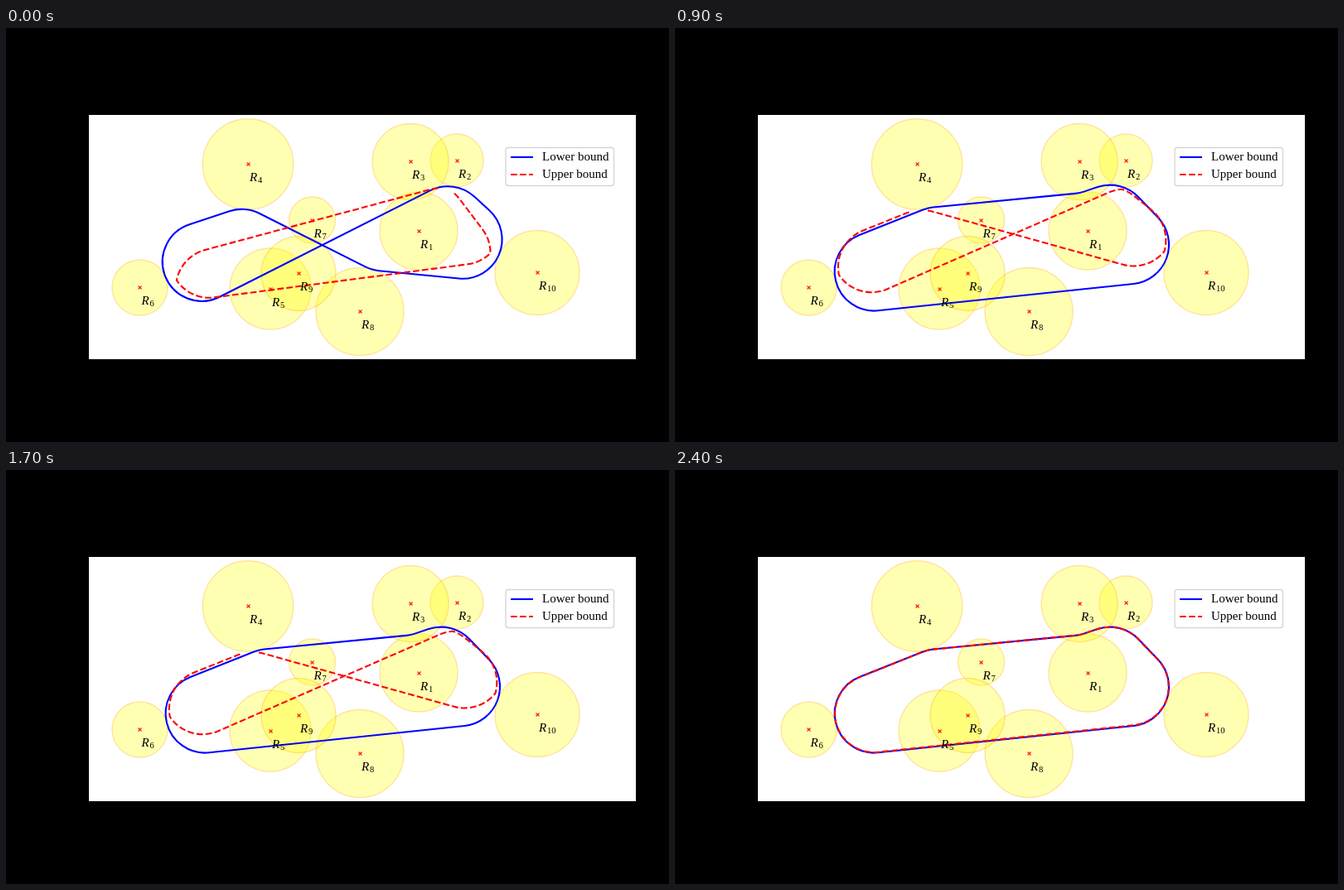
An HTML page with a canvas for the animation above (4500 ms loop, 800 by 500 pixels).

```html
<!DOCTYPE html>
<html lang="en">
<head>
<meta charset="utf-8">
<title>Tour bounds</title>
<style>
  html, body { margin: 0; width: 100%; height: 100%; overflow: hidden; background: #000; }
  canvas { display: block; }
</style>
</head>
<body>
<canvas id="stage" width="800" height="500"></canvas>
<script>
const ctx = document.getElementById('stage').getContext('2d');
const LOOP = 4500, TURN_RADIUS = 47.5, SLACK = 15;
const LINE = 2.1, DASH = [7.7, 3.3], FULL = 2 * Math.PI;
const SERIF = '"Liberation Serif", serif';

// Regions R1..R10: centre x, centre y, radius
const regions = [
  [498, 245, 47], [544, 160, 32], [488, 161.5, 46], [292, 164.5, 54.7], [319, 315, 49],
  [161.5, 313.5, 33.5], [369.5, 232, 28], [427, 342.5, 53], [353, 296.5, 45], [641, 295.5, 51]
];

// Signed sweep from one heading to another when turning clockwise (1) or not (-1)
function sweep(from, to, turn) {
  const angle = turn * (to - from) + 1;
  return ((angle % FULL) + FULL) % FULL - 1;
}

const bearing = (a, b) => Math.atan2(b.y - a.y, b.x - a.x);

// Common tangent of two turning circles: its heading and its cost
function tangent(a, b) {
  const distance = Math.hypot(b.x - a.x, b.y - a.y);
  const offset = (a.turn - b.turn) * TURN_RADIUS;
  const overlap = Math.max(0, Math.abs(offset) - distance);
  const ratio = Math.max(-1, Math.min(1, offset / distance));
  return {
    heading: bearing(a, b) + Math.asin(ratio),
    cost: distance * Math.sqrt(1 - ratio * ratio) + 0.3 * overlap * overlap
  };
}

// Shortest smooth tour touching the regions in the given order; a negative
// number is touched on a left turn. A kink lets the heading jump at each touch
// and leaves a gap at the first one.
function tour(order, kink = 0) {
  const visits = order.map((number, i) => {
    const [x, y, radius] = regions[Math.abs(number) - 1];
    const gap = i === 0 ? Math.min(10, 25 * kink) : 0;
    return { x, y, radius, gap, turn: Math.sign(number), slack: 0 };
  });
  const count = visits.length;
  visits.forEach((v, i) => {
    const arrive = bearing(visits[(i + count - 1) % count], v);
    const leave = bearing(v, visits[(i + 1) % count]);
    v.mid = arrive + v.turn * sweep(arrive, leave, v.turn) / 2;
  });

  // Turning circle before (side -1) or after (side 1) the touch point
  function hub(v, side) {
    const heading = v.mid + side * v.turn * kink / 2;
    const quarter = v.turn * Math.PI / 2;
    const reach = v.radius + v.slack;
    const along = f => -reach * f(v.mid - quarter) + side * v.gap * f(v.mid) - TURN_RADIUS * f(heading - quarter);
    return { x: v.x + along(Math.cos), y: v.y + along(Math.sin), turn: v.turn, heading };
  }

  function layout() {
    let cost = 0;
    for (const v of visits) {
      v.before = hub(v, -1);
      v.after = hub(v, 1);
    }
    visits.forEach((v, i) => {
      const next = visits[(i + 1) % count];
      const leg = tangent(v.after, next.before);
      v.leave = next.arrive = leg.heading;
      cost += leg.cost;
    });
    for (const v of visits) {
      v.sweepIn = sweep(v.arrive, v.before.heading, v.turn);
      v.sweepOut = sweep(v.after.heading, v.leave, v.turn);
      cost += TURN_RADIUS * (Math.abs(v.sweepIn) + Math.abs(v.sweepOut));
    }
    return cost;
  }

  for (let step = 0.1; step > 0.0005; step *= 0.6) {
    for (let pass = 0; pass < 12; pass++) {
      let best = layout();
      for (const v of visits) {
        for (const change of [step, -step]) {
          v.mid += change;
          const cost = layout();
          if (cost < best) best = cost;
          else v.mid -= change;
        }
      }
      layout();
      for (const v of visits) v.slack = SLACK * kink * Math.sin(sweep(v.arrive, v.leave, v.turn) / 2);
    }
  }
  layout();
  return visits;
}

const around = [2, 10, 6, 4, -1];
const crossed = [4, -10, -2, 6];
const ring = kink => tour(around, kink);
const best = ring(0);
const coarse = tour([2, 10, 6], Math.PI / 4);
const eight = tour(crossed, Math.PI / 8);
const near = ring(0.15);
const nearest = ring(0.02);

// Start time, lower bound, upper bound
const steps = [
  [0, tour([2, 10, 8, -4, -6]), coarse],
  [200, tour([2, 10, 6, 4]), coarse],
  [300, ring(0.05), coarse],
  [600, best, coarse],
  [900, best, eight],
  [1000, best, ring(Math.PI / 8)],
  [1200, best, tour([-1, 6, 4, 2, 10], Math.PI / 8)],
  [1300, best, eight],
  [1400, best, ring(0.25)],
  [1700, best, eight],
  [1800, best, ring(0.2)],
  [1900, best, near],
  [2000, best, ring(0.1)],
  [2100, best, nearest],
  [2200, best, tour([2, -1, 10, 6, 4], 0.13)],
  [2300, best, near],
  [2400, best, nearest]
];

function arc({ x, y, turn }, heading, angle) {
  const from = heading - turn * Math.PI / 2;
  ctx.arc(x, y, TURN_RADIUS, from, from + turn * angle, turn * angle < 0);
}

function strokeTour([first, ...others]) {
  const enter = v => arc(v.before, v.arrive, v.sweepIn);
  const exit = v => arc(v.after, v.after.heading, v.sweepOut);
  ctx.beginPath();
  exit(first);
  for (const v of others) {
    enter(v);
    exit(v);
  }
  enter(first);
  ctx.stroke();
}

function setPen(color, dash = [], width = LINE) {
  ctx.strokeStyle = color;
  ctx.lineWidth = width;
  ctx.setLineDash(dash);
}

function line(x1, y1, x2, y2) {
  ctx.beginPath();
  ctx.moveTo(x1, y1);
  ctx.lineTo(x2, y2);
  ctx.stroke();
}

function text(string, x, y, font) {
  ctx.font = `${font} ${SERIF}`;
  ctx.fillStyle = '#000';
  ctx.fillText(string, x, y);
}

function drawRegions() {
  setPen('rgba(255,165,0,.3)', [], 1.4);
  ctx.fillStyle = 'rgba(255,255,0,.3)';
  for (const [x, y, radius] of regions) {
    ctx.beginPath();
    ctx.arc(x, y, radius, 0, FULL);
    ctx.fill();
    ctx.stroke();
  }
  setPen('rgba(255,0,0,.8)', [], 1.4);
  for (const center of regions) {
    const [x, y] = center.map(value => Math.floor(value) + 0.5);
    line(x - 2, y - 2, x + 2, y + 2);
    line(x - 2, y + 2, x + 2, y - 2);
  }
}

function drawLabels() {
  regions.forEach(([x, y], i) => {
    text('R', x + 2, y + 20.5, 'italic 15px');
    text(i + 1, x + 12, y + 22.5, '10.5px');
  });
}

function drawLegend() {
  setPen('rgba(204,204,204,.8)', [], 1.4);
  ctx.fillStyle = 'rgba(255,255,255,.8)';
  ctx.beginPath();
  ctx.roundRect(603, 144.5, 130.5, 46, 3);
  ctx.fill();
  ctx.stroke();
  setPen('#00f');
  line(609, 156, 636, 156);
  setPen('#f00', DASH);
  line(609, 177, 636, 177);
  text('Lower bound', 647, 160, '15px');
  text('Upper bound', 647, 181, '15px');
}

function draw(now) {
  const time = now % LOOP;
  const [, lower, upper] = steps.findLast(([start]) => start <= time);
  ctx.fillStyle = '#000';
  ctx.fillRect(0, 0, 800, 500);
  ctx.fillStyle = '#fff';
  ctx.fillRect(100, 105, 660, 295);
  drawRegions();
  setPen('#00f');
  strokeTour(lower);
  setPen('#f00', DASH);
  strokeTour(upper);
  drawLabels();
  drawLegend();
}

function tick() {
  draw(performance.now());
  requestAnimationFrame(tick);
}
tick();
</script>
</body>
</html>
```
